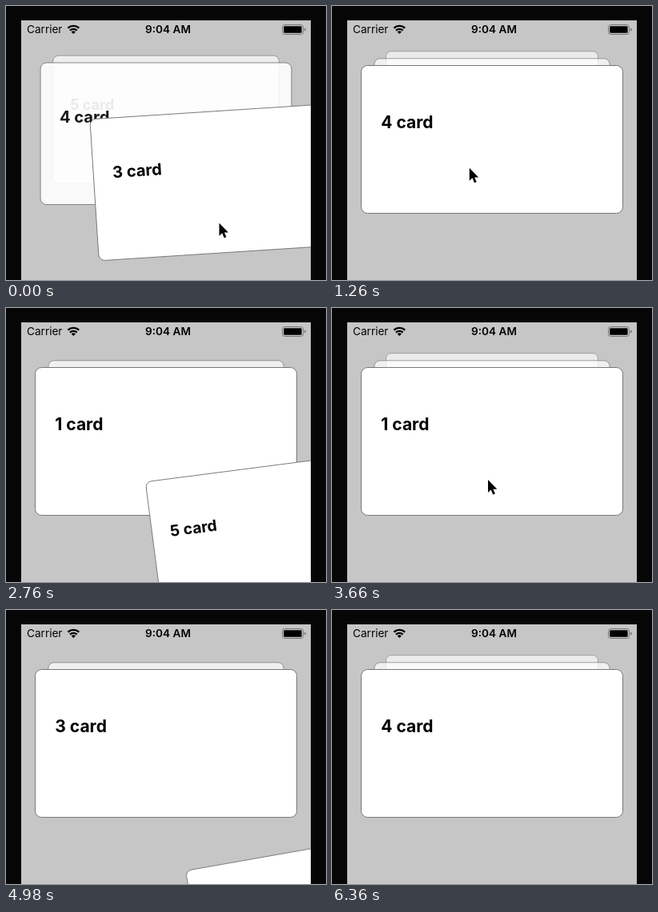
These frames come from a looping animation (400x343 px, 6.6 s). An HTML page:

```html
<!DOCTYPE html>
<html lang="en">
<head>
<meta charset="utf-8">
<title>Card stack</title>
<style>
  html, body { margin: 0; width: 100%; height: 100%; overflow: hidden; background: #060606; }
  svg { display: block; width: 400px; height: 343px; }
  text { font-family: Inter, "Open Sans", sans-serif; }
  .status { font-size: 13.6px; }
  .label { font-size: 21px; font-weight: 700; }
  .card rect { fill: #fff; stroke: #777; stroke-width: 1; }
</style>
</head>
<body>
<svg viewBox="0 0 400 343">
  <defs>
    <clipPath id="screen"><rect x="19" y="18" width="362" height="325"/></clipPath>
  </defs>
  <rect width="400" height="343" fill="#060606"/>
  <g clip-path="url(#screen)">
    <rect x="19" y="18" width="362" height="325" fill="#c6c6c6"/>
    <text class="status" x="26" y="34">Carrier</text>
    <g fill="none" stroke="#000" stroke-width="2.4">
      <path d="M77.4 27.6a10 10 0 0 1 13.8 0"/>
      <path d="M80 30.6a6.2 6.2 0 0 1 8.6 0"/>
      <path d="M84.3 35l-2.6-2.6a3.8 3.8 0 0 1 5.2 0z" fill="#000" stroke="none"/>
    </g>
    <text class="status" x="202.5" y="34" text-anchor="middle" font-weight="600">9:04 AM</text>
    <rect x="345.5" y="23.5" width="26" height="12" rx="3" fill="none" stroke="#747474"/>
    <rect x="347.2" y="25.2" width="22.4" height="8.6" rx="1.2"/>
    <path d="M373 27.5q1.8.4 1.8 2t-1.8 2z" fill="#747474"/>
    <g id="stack"></g>
    <path id="cursor" d="M0 0V16L3.7 12.6 6.2 18.6 8.9 17.4 6.4 11.7H11.4Z"
          stroke="#fff" stroke-width="1.2" paint-order="stroke"/>
  </g>
</svg>
<script>
const LOOP = 6600, STEP = 60;
const CLEAR = 640;      // time from touch until the thrown card is dropped
const APPROACH = 500;   // time the pointer takes to come back
const W = 327, H = 185;
const CX = 200, CY = 167;

// start time, card number, touch point, travel after 300 ms
const swipes = [
  { start: -130, card: 3, touch: [199.5, 218.5], travel: [190.6, 151.5] },
  { start: 1320, card: 4, touch: [171.5, 202.5], travel: [193, 191.5] },
  { start: 2560, card: 5, touch: [218, 238], travel: [222.5, 192] },
  { start: 3680, card: 1, touch: [195, 215], travel: [200, 190] },
  { start: 4640, card: 2, touch: [188, 182], travel: [155.5, 184] },
  { start: 5680, card: 3, touch: [198, 216], travel: [190.6, 151.5] }
];

const svgEl = (name, attrs, parent) => {
  const el = document.createElementNS("http://www.w3.org/2000/svg", name);
  for (const key in attrs) el.setAttribute(key, attrs[key]);
  return parent.appendChild(el);
};

const stack = document.getElementById("stack");
const cursor = document.getElementById("cursor");

function makeCard() {
  const group = svgEl("g", { class: "card" }, stack);
  svgEl("rect", { x: -W / 2, y: -H / 2, width: W, height: H, rx: 8 }, group);
  const label = svgEl("text", { class: "label", x: -138.7, y: -14.3 }, group);
  return { group, label };
}

const [third, second, front] = [makeCard(), makeCard(), makeCard()];
const mix = (a, b, k) => a + (b - a) * k;

function place(card, number, x, y, scale, angle, opacity) {
  card.label.textContent = (number - 1) % 5 + 1 + " card";
  card.group.setAttribute("transform",
    `translate(${x} ${y}) rotate(${angle}) scale(${scale})`);
  card.group.setAttribute("opacity", opacity);
}

function render(t) {
  const index = swipes.findLastIndex(s => s.start <= t);
  const swipe = swipes[index], next = swipes[index + 1];
  const age = t - swipe.start;
  const gone = age >= CLEAR;
  const push = Math.pow(age / 300, 1.25);
  const [dx, dy] = gone ? [0, 0] : swipe.travel.map(v => v * push);
  const number = swipe.card + (gone ? 1 : 0);

  // Sideways drag sets tilt and shrink; distance lifts the cards behind.
  const tilt = Math.min(dx / W, 1);
  const lift = Math.min(Math.hypot(dx, dy) / 143, 1);
  place(front, number, CX + dx, CY + dy, 1 - 0.2 * tilt, -18 * tilt, 1);
  place(second, number + 1, CX, mix(149, CY, lift), mix(0.9, 1, lift), 0, mix(0.75, 1, lift));
  place(third, number + 2, CX, mix(131.6, 149, lift), mix(0.81, 0.9, lift), 0, mix(0.65, 0.75, lift));

  let x = 500, y = 500;
  const k = next ? 1 - (next.start - t) / APPROACH : 0;
  if (k > 0) {
    const rest = Math.pow(1 - k, 3);
    x = mix(next.touch[0], 330, rest);
    y = mix(next.touch[1], 360, rest);
  } else if (!gone) {
    x = swipe.touch[0] + dx;
    y = swipe.touch[1] + dy;
  }
  cursor.setAttribute("transform", `translate(${x} ${y})`);
}

const begin = performance.now();
function tick() {
  const t = (performance.now() - begin) % LOOP;
  render(Math.floor(t / STEP) * STEP);
  requestAnimationFrame(tick);
}
tick();
</script>
</body>
</html>
```
